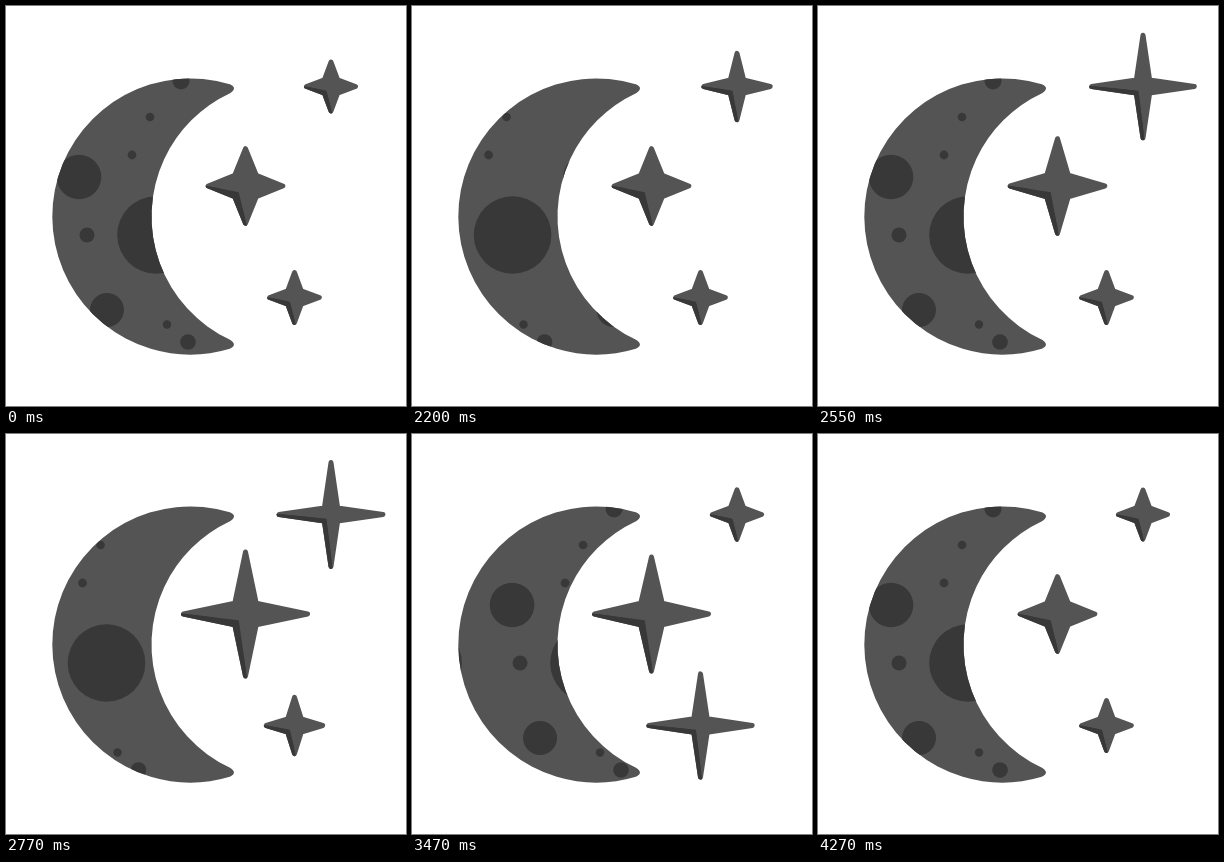
These frames come from a looping animation (400x400 px, 4.3 s). An HTML page with a canvas:

```html
<!DOCTYPE html>
<html lang="en">
<head>
<meta charset="utf-8">
<title>Moon and stars</title>
<style>
  html, body { margin: 0; width: 100%; height: 100%; overflow: hidden; background: #fff; }
  canvas { display: block; width: 400px; height: 400px; }
</style>
</head>
<body>
<canvas id="stage" width="400" height="400"></canvas>
<script>
const ctx = document.getElementById('stage').getContext('2d');
const LOOP = 4300, HOLD = 2020, START = 1995;
const LIGHT = '#545454', DARK = '#383838';

// x, y, radius
const craters = [
  [175, 75, 8.5], [144, 111, 4.3], [126, 149, 4.4], [73, 171, 22.3], [81, 229, 7.5],
  [150, 229, 38.8], [101, 304, 17], [161, 318.5, 4.2], [182, 336, 7.8]
];
// Copies of the surface that scroll past one after another
const copies = [0, 150, 316];

// rest and peak are arm lengths
const stars = [
  { x: 325, y: 80.5, rest: 27, peak: 54.5, delay: 0, span: 1625 },
  { x: 239.5, y: 180, rest: 39.8, peak: 70, delay: 325, span: 1775 },
  { x: 288.5, y: 291.5, rest: 27.3, peak: 54.5, delay: 650, span: 1625 }
];

const clamp = v => Math.min(1, Math.max(0, v));

function bezier(x1, y1, x2, y2) {
  const at = (a, b, p) => 3 * a * p * (1 - p) ** 2 + 3 * b * p * p * (1 - p) + p ** 3;
  return x => {
    let lo = 0, hi = 1;
    for (let i = 0; i < 24; i++) {
      const mid = (lo + hi) / 2;
      if (at(x1, x2, mid) < x) lo = mid; else hi = mid;
    }
    return at(y1, y2, lo);
  };
}
const spin = bezier(0.167, 0.2, 0.3, 1);
const swell = bezier(0.333, 0, 0.45, 1);

// Grow for the first 40 % of the span, then shrink back
function armLength({ rest, peak, delay, span }, t) {
  const u = clamp((t - START - delay) / span);
  return rest + (peak - rest) * swell(u < 0.4 ? u / 0.4 : (1 - u) / 0.6 < 1 ? 1 - shrink(u) : 1);
}
function shrink(u) {
  const p = swell((u - 0.4) / 0.6);
  return p;
}

function polygon(points) {
  ctx.beginPath();
  points.forEach(([x, y]) => ctx.lineTo(x, y));
  ctx.closePath();
}

function moonPath() {
  const cy = 210.5, out = 138, inn = 136;
  const a = Math.acos(39.5 / out), b = Math.acos(57.5 / inn);
  ctx.beginPath();
  ctx.arc(184.3, cy, out, -a, a, true);
  ctx.quadraticCurveTo(232, 339, 224, cy + inn * Math.sin(b));
  ctx.arc(281.5, cy, inn, Math.PI - b, Math.PI + b);
  ctx.quadraticCurveTo(232, 82, 224, cy - out * Math.sin(a));
  ctx.closePath();
}

function drawMoon(shift) {
  ctx.save();
  moonPath();
  ctx.fillStyle = LIGHT;
  ctx.fill();
  ctx.clip();
  ctx.fillStyle = DARK;
  for (const dx of copies) {
    for (const [x, y, r] of craters) {
      ctx.beginPath();
      ctx.arc(x + dx - shift, y, r, 0, 2 * Math.PI);
      ctx.fill();
    }
  }
  ctx.restore();
}

function drawStar({ x, y, rest }, arm) {
  const tip = arm - 2.5, a = rest * 0.32 - 2, far = arm + 3;
  const outline = [[0, -tip], [a, -a], [tip, 0], [a, a], [0, tip], [-a, a], [-tip, 0], [-a, -a]];
  const paint = color => {
    polygon(outline);
    ctx.fillStyle = ctx.strokeStyle = color;
    ctx.fill();
    ctx.stroke();
  };
  ctx.save();
  ctx.translate(x, y);
  ctx.lineWidth = 5;
  ctx.lineJoin = 'round';
  paint(LIGHT);
  // Shaded lower left side
  polygon([[-far, -1], [-rest * 0.17, rest * 0.16], [2, far], [-far, far]]);
  ctx.clip();
  paint(DARK);
  ctx.restore();
}

function draw(time) {
  const t = time < HOLD ? 0 : time;
  ctx.fillStyle = '#fff';
  ctx.fillRect(0, 0, 400, 400);
  drawMoon(316 * spin(clamp((t - START) / 2300)));
  stars.forEach(s => drawStar(s, armLength(s, t)));
}

const start = performance.now();
function tick() {
  draw((performance.now() - start) % LOOP);
  requestAnimationFrame(tick);
}
tick();
</script>
</body>
</html>
```
